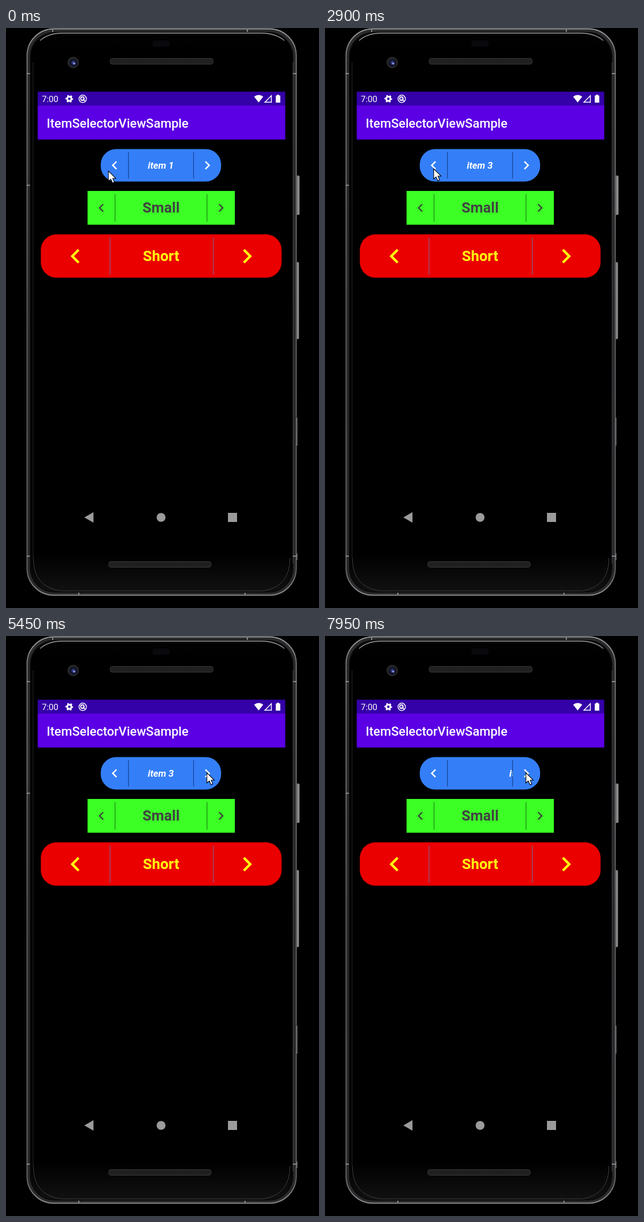
An HTML page that plays this animation: 550 by 1018 pixels, repeating every 8000 ms.

```html
<!DOCTYPE html>
<html lang="en">
<head>
<meta charset="utf-8">
<title>Item selector</title>
<style>
html, body { margin: 0; width: 100%; height: 100%; overflow: hidden; background: #000; }
svg { display: block; width: 550px; height: 1018px; }
text { font-family: Roboto, "Noto Sans", sans-serif; }
.mid { text-anchor: middle; font-weight: 700; }
</style>
</head>
<body>
<svg viewBox="0 0 550 1018" xmlns="http://www.w3.org/2000/svg">
  <defs>
    <linearGradient id="rim" x1="0" y1="0" x2="0" y2="1">
      <stop offset="0" stop-color="#9a9a9c"/>
      <stop offset=".05" stop-color="#6c6c6e"/>
      <stop offset=".5" stop-color="#58585a"/>
      <stop offset=".95" stop-color="#5c5c5e"/>
      <stop offset="1" stop-color="#8a8a8c"/>
    </linearGradient>
    <linearGradient id="glass" x1="0" y1="0" x2="0" y2="1">
      <stop offset="0" stop-color="#030303"/>
      <stop offset=".03" stop-color="#000"/>
      <stop offset=".93" stop-color="#000"/>
      <stop offset=".98" stop-color="#0d0c0d"/>
      <stop offset="1" stop-color="#121112"/>
    </linearGradient>
    <linearGradient id="key" x1="0" y1="0" x2="1" y2="0">
      <stop offset="0" stop-color="#3a3a3c"/>
      <stop offset=".6" stop-color="#9a9a9c"/>
      <stop offset="1" stop-color="#606062"/>
    </linearGradient>
    <radialGradient id="lens">
      <stop offset="0" stop-color="#5a68c0"/>
      <stop offset=".45" stop-color="#1d2250"/>
      <stop offset="1" stop-color="#0a0a12"/>
    </radialGradient>
    <pattern id="mesh" width="3" height="3" patternUnits="userSpaceOnUse">
      <rect width="3" height="3" fill="#121212"/>
      <path d="M0 0L3 3M3 0L0 3" stroke="#343434" stroke-width=".7"/>
    </pattern>
    <path id="prev" d="M3.410 -4.590L2 -6L-4 0L2 6L3.410 4.590L-1.170 0Z"/>
    <path id="next" d="M-3.410 -4.590L-2 -6L4 0L-2 6L-3.410 4.590L1.170 0Z"/>
    <clipPath id="window"><rect x="216" y="213" width="113.500" height="56"/></clipPath>
  </defs>

  <rect width="550" height="1018" fill="#000"/>

  <!-- phone body -->
  <g fill="url(#key)">
    <rect x="509.500" y="259" width="6.500" height="69" rx="2"/>
    <rect x="509.500" y="411" width="5.500" height="135" rx="2"/>
    <rect x="509.500" y="684" width="2.500" height="49"/>
    <rect x="509.500" y="922" width="2.500" height="12"/>
  </g>
  <rect x="37" y="1.500" width="473" height="994" rx="47" fill="#2a2a2c" stroke="url(#rim)" stroke-width="2"/>
  <rect x="43" y="8" width="461" height="982" rx="42" fill="url(#glass)" stroke="#0a0a0b" stroke-width="2"/>
  <path d="M504.500 60V940M48 930Q48 981 96 988H452Q499 981 499 930" fill="none" stroke="#3c3c3e" stroke-width="1"/>
  <path d="M47.500 60V930" stroke="#1c1c1e" stroke-width="1.500"/>
  <path d="M60 22Q74 9 100 9H448Q474 9 489 22" fill="none" stroke="#9b9b9d" stroke-width="1.400"/>
  <path d="M36 80H42M504 80H511M36 276H42M36 927H42M504 927H511M82 1V7M424 1V7M128 991V996M420 991V996" stroke="#88888a" stroke-width="2"/>

  <rect x="257" y="22" width="31" height="11" rx="5" fill="#09090d"/>
  <circle cx="118" cy="60.500" r="10" fill="#28282b"/>
  <circle cx="118.500" cy="61" r="7" fill="url(#lens)"/>
  <circle cx="120" cy="62.500" r="1.500" fill="#a6b2ff"/>
  <g fill="url(#mesh)" stroke="#383838" stroke-width="1">
    <rect x="183" y="53.500" width="181" height="10" rx="4"/>
    <rect x="180.500" y="936.500" width="180" height="10" rx="4"/>
  </g>

  <!-- status and title bars -->
  <rect x="55.700" y="111.700" width="435" height="24.500" fill="#3400a8"/>
  <rect x="55.700" y="136" width="435" height="59.700" fill="#5b00e4"/>
  <text x="63" y="130" font-size="15" fill="#fff">7:00</text>
  <g fill="none" stroke="#fff">
    <circle cx="111.300" cy="124.300" r="3.700" stroke-width="3"/>
    <circle cx="111.300" cy="124.300" r="5.800" stroke-width="2" stroke-dasharray="3 3.074" stroke-dashoffset="1.500"/>
    <circle cx="134.800" cy="124.300" r="6.500" stroke-width="1.400"/>
    <circle cx="134.300" cy="124" r="3" stroke-width="1.800"/>
    <path d="M135 124.500L139.500 129" stroke-width="1.600"/>
    <path d="M455 130.300H466.300V118.800Z" stroke-width="1.500"/>
  </g>
  <path d="M436 120.500Q444 114.500 452 120.500L444 130.800Z" fill="#fff"/>
  <path d="M476.300 117H479.700V118.400H482V131H474V118.400H476.300Z" fill="#fff"/>
  <text x="71.500" y="174.600" font-size="22.100" font-weight="500" fill="#fff">ItemSelectorViewSample</text>

  <!-- blue selector -->
  <rect x="166.500" y="212.500" width="211.500" height="57" rx="27" fill="#347ff8"/>
  <path d="M215.300 218V264M329.600 218V264" stroke="#174793" stroke-width="1.300"/>
  <g fill="#fff">
    <use href="#prev" transform="translate(190.800 241) scale(1.250)"/>
    <use href="#next" transform="translate(353.800 241) scale(1.250)"/>
  </g>
  <g clip-path="url(#window)">
    <text id="item" class="mid" x="272" y="247" font-size="16.600" font-style="italic" fill="#fff">item 1</text>
  </g>
  <path id="pressL" d="M215 212.500H193.500A27 27 0 0 0 166.500 239.500V242.500A27 27 0 0 0 193.500 269.500H215Z" fill="#c6d9fb" opacity="0"/>
  <path id="pressR" d="M330 212.500H351A27 27 0 0 1 378 239.500V242.500A27 27 0 0 1 351 269.500H330Z" fill="#c6d9fb" opacity="0"/>

  <!-- green selector -->
  <rect x="143.300" y="286" width="258.900" height="59.300" fill="#3bff25"/>
  <path d="M191.600 291.500V340M353.300 291.500V340" stroke="#1d8f17" stroke-width="1.300"/>
  <g fill="#3a483a">
    <use href="#prev" transform="translate(167.500 315.700) scale(1.220)"/>
    <use href="#next" transform="translate(377.700 315.700) scale(1.220)"/>
  </g>
  <text class="mid" x="272.500" y="324.300" font-size="25.700" fill="#424242">Small</text>

  <!-- red selector -->
  <rect x="61.500" y="362.500" width="422.500" height="75.500" rx="27" fill="#eb0000" stroke="#b80000"/>
  <path d="M182.700 367.500V433M364.400 367.500V433" stroke="#a4405a" stroke-width="2"/>
  <g fill="#ffff10">
    <use href="#prev" transform="translate(121.900 400.500) scale(2.120)"/>
    <use href="#next" transform="translate(423.700 400.500) scale(2.120)"/>
  </g>
  <text class="mid" x="272.500" y="409" font-size="25.900" fill="#ffff10">Short</text>

  <!-- navigation keys -->
  <g fill="#9b9b9b">
    <path d="M137.700 859L153.700 849.700V868.300Z"/>
    <circle cx="272.500" cy="859" r="7.800"/>
    <rect x="390" y="851" width="16" height="16"/>
  </g>

  <path id="cursor" d="M0 0V18L4.200 14.300L7.200 21L10.400 19.600L7.500 13H13Z" fill="#fff" stroke="#000" stroke-width="1.100"/>
</svg>
<script>
const LOOP = 8000, STEP = 50, HALF = 300, TRAVEL = 114, COUNT = 4;
// click time and direction: -1 previous, 1 next
const clicks = [[410, -1], [2150, -1], [3200, -1], [4580, 1], [5580, 1], [6555, 1], [7530, 1]];
// pointer path: time, x, y
const path = [
  [0, 180, 251], [250, 191, 247], [500, 193, 246], [700, 202, 245],
  [1200, 262, 247], [1750, 268, 247], [2050, 191, 247], [3500, 191, 247],
  [4250, 341, 240], [4450, 352, 235], [4700, 352, 235], [5100, 353, 240], [LOOP, 353, 240]
];
const $ = id => document.getElementById(id);
const item = $("item"), cursor = $("cursor"), presses = { "-1": $("pressL"), "1": $("pressR") };
const clamp = v => Math.max(0, Math.min(1, v));
const ease = v => (1 - Math.cos(Math.PI * clamp(v))) / 2;

function pointer(t) {
  const i = Math.max(1, path.findIndex(p => p[0] > t));
  const [t0, x0, y0] = path[i - 1], [t1, x1, y1] = path[i];
  const k = ease((t - t0) / (t1 - t0));
  return [x0 + (x1 - x0) * k, y0 + (y1 - y0) * k];
}

const glow = d => Math.min(clamp((d + 100) / 60), clamp((250 - d) / 190));

function draw(t) {
  let index = 0, shift = 0;
  const light = { "-1": 0, "1": 0 };
  for (const [at, dir] of clicks) {
    const d = t - at;
    light[dir] = Math.max(light[dir], glow(d));
    if (d < 0) continue;
    if (d < HALF) {
      shift = -dir * TRAVEL * ease(d / HALF);
    } else {
      index = (index + dir + COUNT) % COUNT;
      shift = dir * TRAVEL * (1 - ease(d / HALF - 1));
    }
  }
  item.textContent = "item " + (index + 1);
  item.setAttribute("x", 272 + shift);
  for (const dir in presses) presses[dir].setAttribute("opacity", light[dir]);
  cursor.setAttribute("transform", `translate(${pointer(t)})`);
}

const start = performance.now();
function tick() {
  const t = (performance.now() - start) % LOOP;
  draw(Math.floor(t / STEP) * STEP);
  requestAnimationFrame(tick);
}
tick();
</script>
</body>
</html>
```
